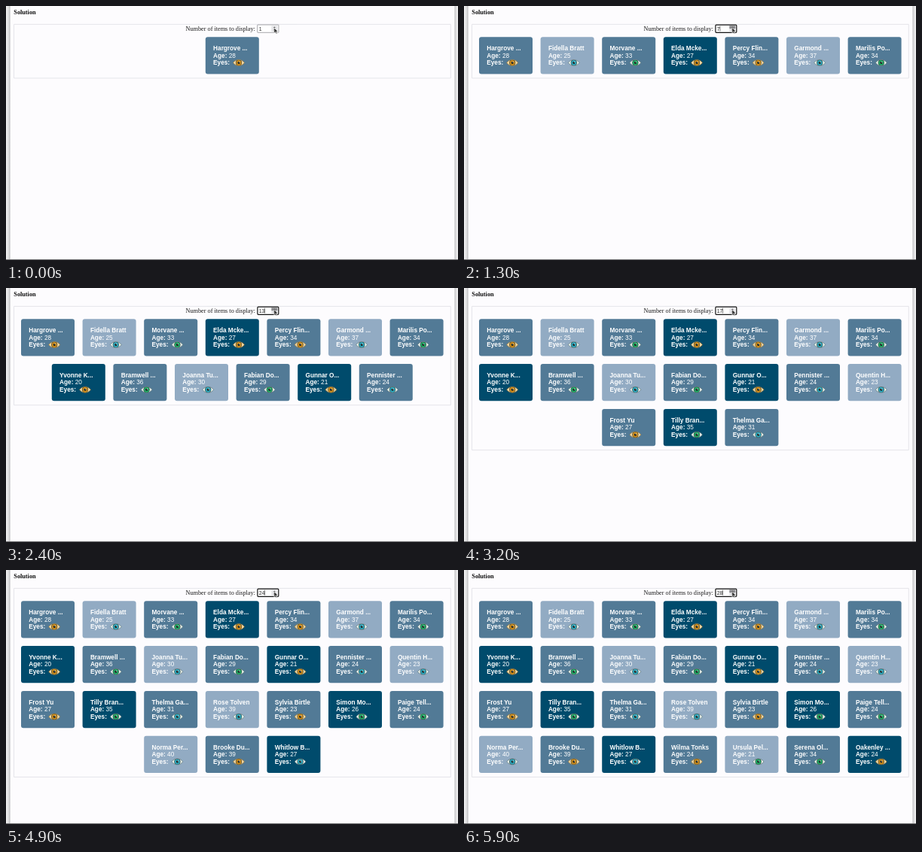
These frames come from a looping animation (600x338 px, 6 s). An HTML page with a canvas:

```html
<!DOCTYPE html>
<html lang="en">
<head>
<meta charset="utf-8">
<title>Solution</title>
<style>
html, body { margin: 0; width: 100%; height: 100%; overflow: hidden; background: #fdfcfe; }
canvas { display: block; width: 600px; height: 338px; }
</style>
</head>
<body>
<canvas id="stage"></canvas>
<script>
const canvas = document.getElementById('stage');
const ctx = canvas.getContext('2d');
const dpr = window.devicePixelRatio || 1;
canvas.width = 600 * dpr;
canvas.height = 338 * dpr;

const LOOP = 6000, STEP = 100, PRESS = 140;
const SIZE = 8.24;
const SANS = '"Liberation Sans", Arial, sans-serif';
const SERIF = '"Liberation Serif", "Times New Roman", serif';
const PAGE = '#fdfcfe';
const PER_ROW = 7, PITCH_X = 81.6, PITCH_Y = 59.85;
const CARD = { w: 71, h: 49.3, top: 41.2, pad: 10.3 };
const FILLS = ['#527a96', '#92abc3', '#527a96', '#004b6c'];
const IRIS = { a: '#c98a1c', b: '#2fa3b8', g: '#22a565' };

const names = [
  'Hargrove ...', 'Fidella Bratt', 'Morvane ...', 'Elda Mcke...', 'Percy Flin...', 'Garmond ...', 'Marilis Po...',
  'Yvonne K...', 'Bramwell ...', 'Joanna Tu...', 'Fabian Do...', 'Gunnar O...', 'Pennister ...', 'Quentin H...',
  'Frost Yu', 'Tilly Bran...', 'Thelma Ga...', 'Rose Tolven', 'Sylvia Birtle', 'Simon Mo...', 'Paige Tell...',
  'Norma Per...', 'Brooke Du...', 'Whitlow B...', 'Wilma Tonks', 'Ursula Pel...', 'Serena Ol...', 'Oakenley ...'
];
const ages = [28, 25, 33, 27, 34, 37, 34, 20, 36, 30, 29, 21, 24, 23,
  27, 35, 31, 39, 23, 26, 24, 40, 39, 27, 24, 21, 34, 24];
const eyes = 'abgaabgagbgabbagbbaggbabagga';

// moments at which the up button is pressed
const clicks = [500, 600, 750, 900, 1100, 1200, 1400, 1500, 1650, 1900, 2100, 2300, 2500, 2700,
  2900, 3050, 3300, 3600, 3800, 4050, 4300, 4500, 4700, 5000, 5200, 5500, 5800];

function text(str, x, y, font, color) {
  ctx.font = font;
  ctx.fillStyle = color;
  ctx.fillText(str, x, y);
  return ctx.measureText(str).width;
}

function box(x, y, w, h, r, fill) {
  ctx.beginPath();
  ctx.roundRect(x, y, w, h, r);
  ctx.fillStyle = fill;
  ctx.fill();
}

function frame(x, y, w, h, r, color, width) {
  ctx.beginPath();
  ctx.roundRect(x, y, w, h, r);
  ctx.strokeStyle = color;
  ctx.lineWidth = width;
  ctx.stroke();
}

function disc(x, y, r, fill) {
  ctx.beginPath();
  ctx.arc(x, y, r, 0, Math.PI * 2);
  ctx.fillStyle = fill;
  ctx.fill();
}

function eye(x, y, kind) {
  ctx.save();
  ctx.beginPath();
  ctx.moveTo(x - 7.4, y);
  ctx.bezierCurveTo(x - 4, y - 5.2, x + 4, y - 5.2, x + 7.4, y);
  ctx.bezierCurveTo(x + 4, y + 5.2, x - 4, y + 5.2, x - 7.4, y);
  ctx.fillStyle = kind === 'a' ? '#efd9a8' : '#e3eee9';
  ctx.fill();
  ctx.strokeStyle = kind === 'a' ? '#a87524' : '#51686c';
  ctx.lineWidth = 0.6;
  ctx.stroke();
  ctx.clip();
  disc(x, y, 4.1, '#38413c');
  disc(x, y, 3.6, IRIS[kind]);
  disc(x, y, 1.5, '#1d2523');
  disc(x + 0.9, y - 1, 0.6, '#f5f8f5');
  ctx.restore();
}

function card(i, x, y) {
  box(x, y, CARD.w, CARD.h, 3, FILLS[i % 4]);
  const bold = `bold ${SIZE}px ${SANS}`, left = x + CARD.pad;
  text(names[i], left, y + 17.9, bold, '#fff');
  const w = text('Age: ', left, y + 27.4, bold, '#fff');
  text(ages[i], left + w, y + 27.4, `${SIZE}px ${SANS}`, '#fff');
  text('Eyes:', left, y + 36.9, bold, '#fff');
  eye(x + 44.2, y + 34.3, eyes[i]);
}

function cards(count) {
  for (let i = 0; i < count; i++) {
    const row = Math.floor(i / PER_ROW);
    const inRow = Math.min(PER_ROW, count - row * PER_ROW);
    const left = 300.4 - inRow * PITCH_X / 2 + 5.2;
    card(i, left + (i % PER_ROW) * PITCH_X, CARD.top + row * PITCH_Y);
  }
}

function triangle(x, y, dir) {
  ctx.beginPath();
  ctx.moveTo(x - 1.5, y + dir);
  ctx.lineTo(x, y - dir);
  ctx.lineTo(x + 1.5, y + dir);
  ctx.fillStyle = '#4a4a4a';
  ctx.fill();
}

function pointer(x, y) {
  const pts = [[0, 0], [0, 7.2], [1.7, 5.7], [2.9, 8.2], [4.1, 7.6], [3, 5.2], [5.2, 5.1]];
  ctx.beginPath();
  pts.forEach(([dx, dy]) => ctx.lineTo(x + dx, y + dy));
  ctx.closePath();
  ctx.fillStyle = '#333';
  ctx.fill();
  ctx.strokeStyle = '#f4f4f4';
  ctx.lineWidth = 0.6;
  ctx.stroke();
}

function input(count, focused, pressed) {
  box(333.5, 25, 28.5, 10.3, 1, '#fff');
  if (focused) frame(333.9, 25.1, 27.9, 10.2, 1, '#151515', 1.2);
  else frame(333.7, 25, 28.2, 10.3, 0.5, '#85858a', 0.7);
  const w = text(count, 335.7, 32.5, `6.87px ${SANS}`, '#333');
  if (focused) {
    ctx.fillStyle = '#222';
    ctx.fillRect(335.8 + w, 26.7, 0.6, 6.9);
  }
  box(352.3, 26.3, 8, 7.8, 0, '#e7e7ea');
  if (pressed) box(352.3, 26.3, 8, 3.9, 0, '#8b8b8f');
  triangle(356.3, 28.2, 0.8);
  triangle(356.3, 32.2, -0.8);
}

function page() {
  ctx.fillStyle = PAGE;
  ctx.fillRect(0, 0, 600, 338);
  [[0, 5.5], [600, 595.5]].forEach(([outer, inner]) => {
    const g = ctx.createLinearGradient(outer, 0, inner, 0);
    g.addColorStop(0, '#f1f1f2');
    g.addColorStop(0.6, '#e0e0e1');
    g.addColorStop(1, '#b9b9bb');
    ctx.fillStyle = g;
    ctx.fillRect(Math.min(outer, inner), 0, Math.abs(outer - inner), 338);
  });
  ctx.fillStyle = '#737375';
  ctx.fillRect(0, 337, 600, 1);
}

function draw(t) {
  const done = clicks.filter(c => c <= t);
  const count = 1 + done.length;
  const focused = done.length > 0;
  const pressed = focused && t - done[done.length - 1] < PRESS;
  const rows = Math.ceil(count / PER_ROW);

  ctx.setTransform(dpr, 0, 0, dpr, 0, 0);
  page();
  text('Solution', 10.3, 10.8, `bold ${SIZE}px ${SERIF}`, '#111');
  frame(10.5, 24.4, 579.8, 71.6 + (rows - 1) * PITCH_Y, 0, '#e3e2e8', 0.9);
  text('Number of items to display:', 238.5, 32.5, `${SIZE}px ${SERIF}`, '#1a1a1a');
  cards(count);
  input(count, focused, pressed);
  pointer(355.8, t < STEP ? 28.9 : 28.6);
}

function tick(now) {
  draw(Math.floor((now % LOOP) / STEP) * STEP);
  requestAnimationFrame(tick);
}
requestAnimationFrame(tick);
</script>
</body>
</html>
```
